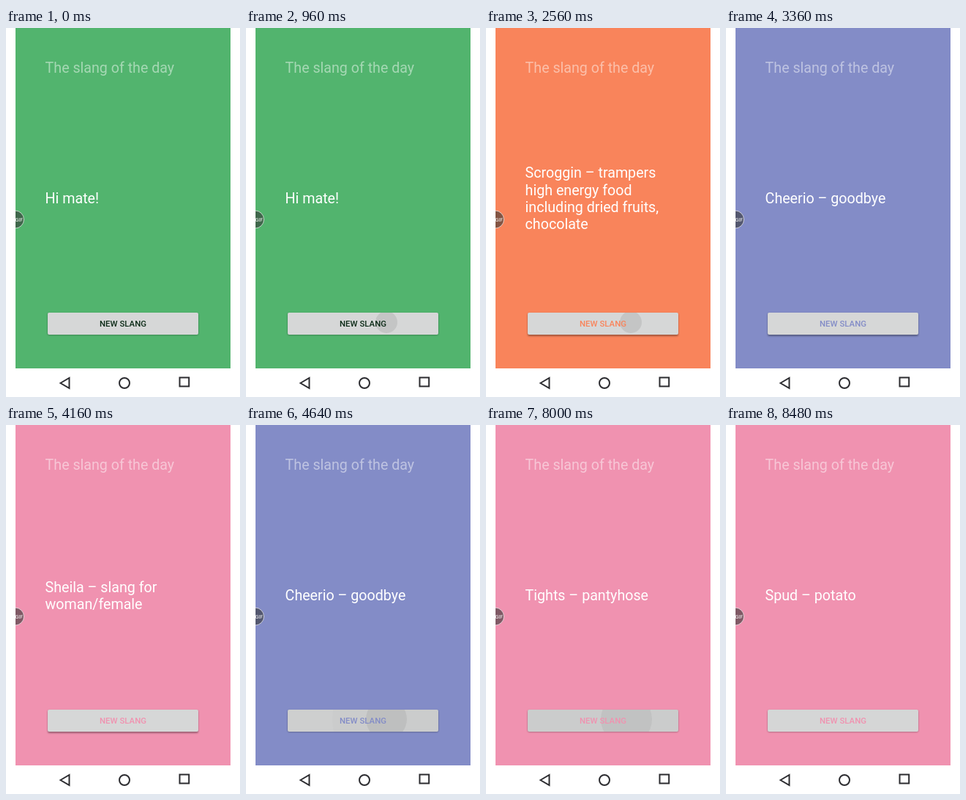
An HTML page that plays this animation: 320 px wide and 503 px high, repeating every 9.6 s.

```html
<!DOCTYPE html>
<html lang="en">
<head>
<meta charset="utf-8">
<title>Slang of the day</title>
<style>
  html, body { margin: 0; width: 100%; height: 100%; overflow: hidden; background: #fff; }
  svg { display: block; width: 100vw; height: 100vh; font-family: Roboto, sans-serif; }
  .large { font-size: 19.65px; fill: #fff; }
  .icons { fill: none; stroke: #2c2c30; stroke-width: 2; }
</style>
</head>
<body>
<svg viewBox="0 0 320 503">
  <defs>
    <clipPath id="screenClip"><rect x="13" width="294" height="503"/></clipPath>
    <clipPath id="buttonClip"><rect x="57" y="388" width="206" height="30" rx="2"/></clipPath>
    <filter id="blur" x="-10%" y="-30%" width="120%" height="170%"><feGaussianBlur stdDeviation="1.1"/></filter>
  </defs>

  <rect id="screen" x="13" width="294" height="464"/>
  <text class="large" x="53.6" y="61" opacity=".48">The slang of the day</text>
  <text class="large" id="slang"></text>

  <rect id="shadow" x="57" y="389" width="206" rx="2" opacity=".35" filter="url(#blur)"/>
  <g clip-path="url(#buttonClip)">
    <rect x="57" y="388" width="206" height="30" fill="#d6d7d7"/>
    <rect id="tint" x="57" y="388" width="206" height="30"/>
    <g id="ripples"></g>
  </g>
  <text id="label" x="160" y="407.2" font-size="11.4" font-weight="500" text-anchor="middle">NEW SLANG</text>

  <g clip-path="url(#screenClip)">
    <circle cx="12.5" cy="261" r="12" fill="#333" fill-opacity=".6" stroke="#fff" stroke-opacity=".65"/>
    <text x="12.6" y="263.5" font-size="7" fill="#fff">GIF</text>
  </g>
  <g class="icons">
    <path d="M74.5 484 86.5 477V491Z"/>
    <circle cx="162" cy="484" r="7"/>
    <path d="M237.5 476.5H250.2V488.5H237.5Z"/>
  </g>
</svg>
<script>
const LOOP = 9600, STEP = 160, RELEASE_DELAY = 200, LINE = 23.3;
const GREEN = '#52b46e', ORANGE = '#f9845b', PINK = '#f092b0', PURPLE = '#838cc7';

const greeting = { lines: ['Hi mate!'], color: GREEN, label: '#0b2a16' };
const chrissy = { lines: ['Chrissy pressies –', 'Christmas presents'], color: GREEN };
const scroggin = {
  lines: ['Scroggin – trampers', 'high energy food', 'including dried fruits,', 'chocolate'],
  color: ORANGE
};
const cheerio = { lines: ['Cheerio – goodbye'], color: PURPLE };
const sheila = { lines: ['Sheila – slang for', 'woman/female'], color: PINK };
const tights = { lines: ['Tights – pantyhose'], color: PINK };
const spud = { lines: ['Spud – potato'], color: PINK };

// Each press shows its slang once the finger is lifted.
const presses = [
  { at: 960, x: 192, slang: chrissy },
  { at: 1425, x: 192, slang: scroggin },
  { at: 1950, x: 195, slang: scroggin },
  { at: 2560, x: 198, slang: cheerio },
  { at: 3500, x: 194, slang: sheila },
  { at: 4345, x: 192, slang: cheerio },
  { at: 4575, x: 192, slang: tights },
  { at: 5000, x: 192, slang: tights },
  { at: 7900, x: 192, slang: spud }
];

const $ = id => document.getElementById(id);
const set = (id, attributes) => {
  for (const [name, value] of Object.entries(attributes)) $(id).setAttribute(name, value);
};
const latestPress = time => presses.filter(press => press.at <= time).pop();

// The screen is sampled in steps and rests between the taps.
function sampleTime(time) {
  if (time >= 5440 && time < 8000) return 5440;
  return Math.min(8480, Math.floor(time / STEP) * STEP);
}

function buttonTint(time) {
  const press = latestPress(time);
  if (!press) return 0;
  const age = time - press.at;
  return 0.09 * Math.min(1, age / 150) * Math.max(0, 1 - age / 600);
}

function isRaised(time) {
  const press = latestPress(time - 100);
  const age = press ? time - 100 - press.at : 0;
  return age > 500 && age < 800;
}

function rippleMarkup(time) {
  return presses.filter(({ at }) => time >= at && time < at + 420).map(({ at, x }) => {
    const age = time - at;
    const opacity = Math.max(0.015, 0.085 - age * 0.00035);
    return `<circle cx="${x}" cy="401" r="${15 + age * 0.2}" opacity="${opacity}"/>`;
  }).join('');
}

function draw(time) {
  const press = latestPress(time - RELEASE_DELAY);
  const { lines, color, label = color } = press ? press.slang : greeting;
  const firstBaseline = 239.2 - (lines.length - 1) * LINE / 2;
  $('slang').innerHTML = lines.map((line, i) =>
    `<tspan x="53.6" y="${firstBaseline + i * LINE}">${line}</tspan>`).join('');
  set('screen', { fill: color });
  set('label', { fill: label });
  set('tint', { opacity: buttonTint(time) });
  set('shadow', { height: isRaised(time) ? 31 : 29.5 });
  $('ripples').innerHTML = rippleMarkup(time);
}

let shown = -1;
function tick() {
  const time = sampleTime(performance.now() % LOOP);
  if (time !== shown) draw(shown = time);
  requestAnimationFrame(tick);
}
tick();
</script>
</body>
</html>
```
